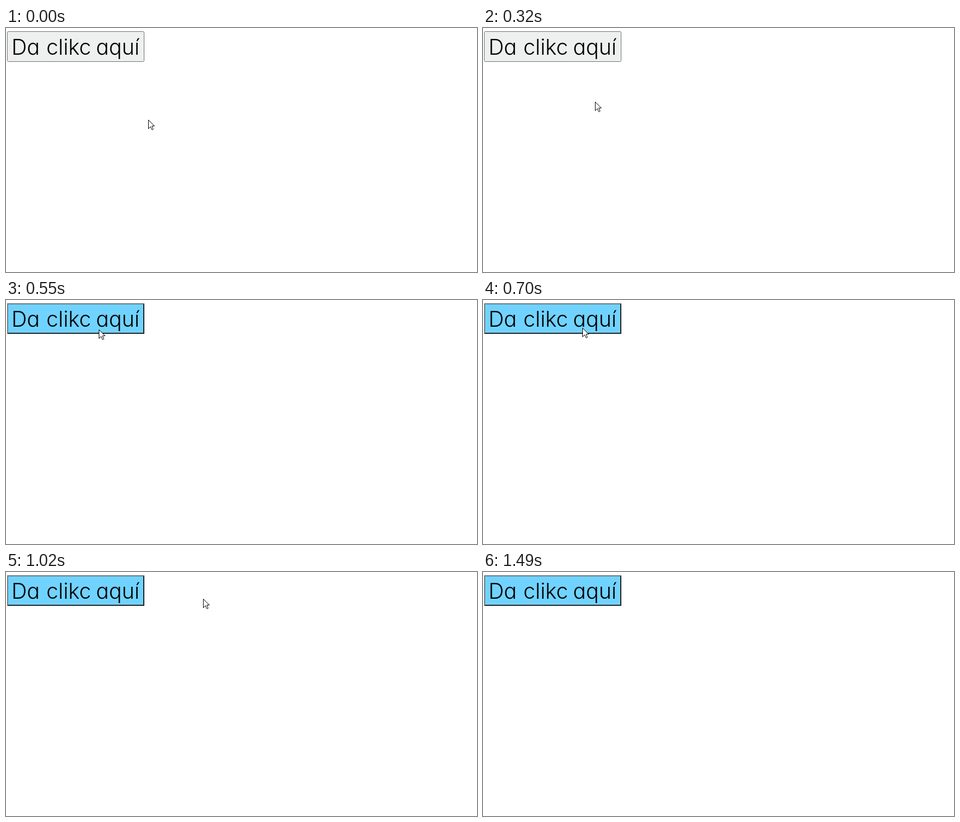
An HTML page for the animation above (1.72 s loop, 858x447 px).

```html
<!DOCTYPE html>
<html lang="es">
<head>
<meta charset="utf-8">
<title>Botón</title>
<style>
  html, body { margin: 0; width: 100%; height: 100%; overflow: hidden; background: #fff; }
  svg { display: block; }
  text { font: 300 39px Inter, Lato, sans-serif; font-feature-settings: "cv11"; }
</style>
</head>
<body>
<svg width="858" height="447" viewBox="0 0 858 447">
  <rect id="idle" x="2.5" y="6.5" width="249" height="55" rx="2" fill="#eef0ef" stroke="#6f6f6f"/>
  <g id="active">
    <rect x="2" y="6" width="250" height="56" fill="#70d3ff"/>
    <path d="M2 62V6H252L250 8H4V60Z" fill="#767676"/>
    <path d="M252 6V62H2L4 60H250V8Z" fill="#212121"/>
  </g>
  <text y="49"><tspan x="10">Da </tspan><tspan x="73.5">clikc </tspan><tspan x="164">aquí</tspan></text>
  <path id="cursor" d="M.5 .5V16.5L4.3 12.7 6.8 18.3H8.3L9.2 17.3 6.9 11.6H11.5Z" fill="#fff" stroke="#000"/>
</svg>
<script>
  const LOOP = 1720, TICK = LOOP / 22;
  const PRESS = 7, LEAVE = 19; // in ticks

  const linear = p => p;
  const easeIn = p => p * p;
  const easeOut = p => p * (2 - p);

  // Strokes of the hand, timed in ticks; the pointer rests in the gaps.
  const start = { x: 259, y: 168 };
  const strokes = [
    { from: 0, to: 1, x: 213, y: 140, ease: linear },
    { from: 3, to: 4, x: 204, y: 135, ease: linear },
    { from: 4, to: 6, x: 168, y: 66, ease: linear },
    { from: 6, to: PRESS, x: 169, y: 54, ease: linear },
    { from: PRESS, to: 10, x: 281, y: 24, ease: easeIn },
    { from: 10, to: 13, x: 359, y: 49, ease: easeOut },
    { from: 16, to: 18, x: 714, y: 393, ease: easeIn }
  ];

  function pointerAt(tick) {
    let { x, y } = start;
    for (const s of strokes) {
      const progress = Math.min(1, Math.max(0, (tick - s.from) / (s.to - s.from)));
      const k = s.ease(progress);
      x += (s.x - x) * k;
      y += (s.y - y) * k;
    }
    return [Math.round(x), Math.round(y)];
  }

  const [idle, active, cursor] = ["idle", "active", "cursor"].map(id => document.getElementById(id));
  const show = (el, on) => el.setAttribute("visibility", on ? "visible" : "hidden");

  function draw(time) {
    const tick = Math.floor(time / TICK);
    cursor.setAttribute("transform", `translate(${pointerAt(tick)})`);
    show(cursor, tick < LEAVE);
    show(idle, tick < PRESS);
    show(active, tick >= PRESS);
  }

  const began = performance.now();
  function animate() {
    draw((performance.now() - began) % LOOP);
    requestAnimationFrame(animate);
  }
  animate();
</script>
</body>
</html>
```
